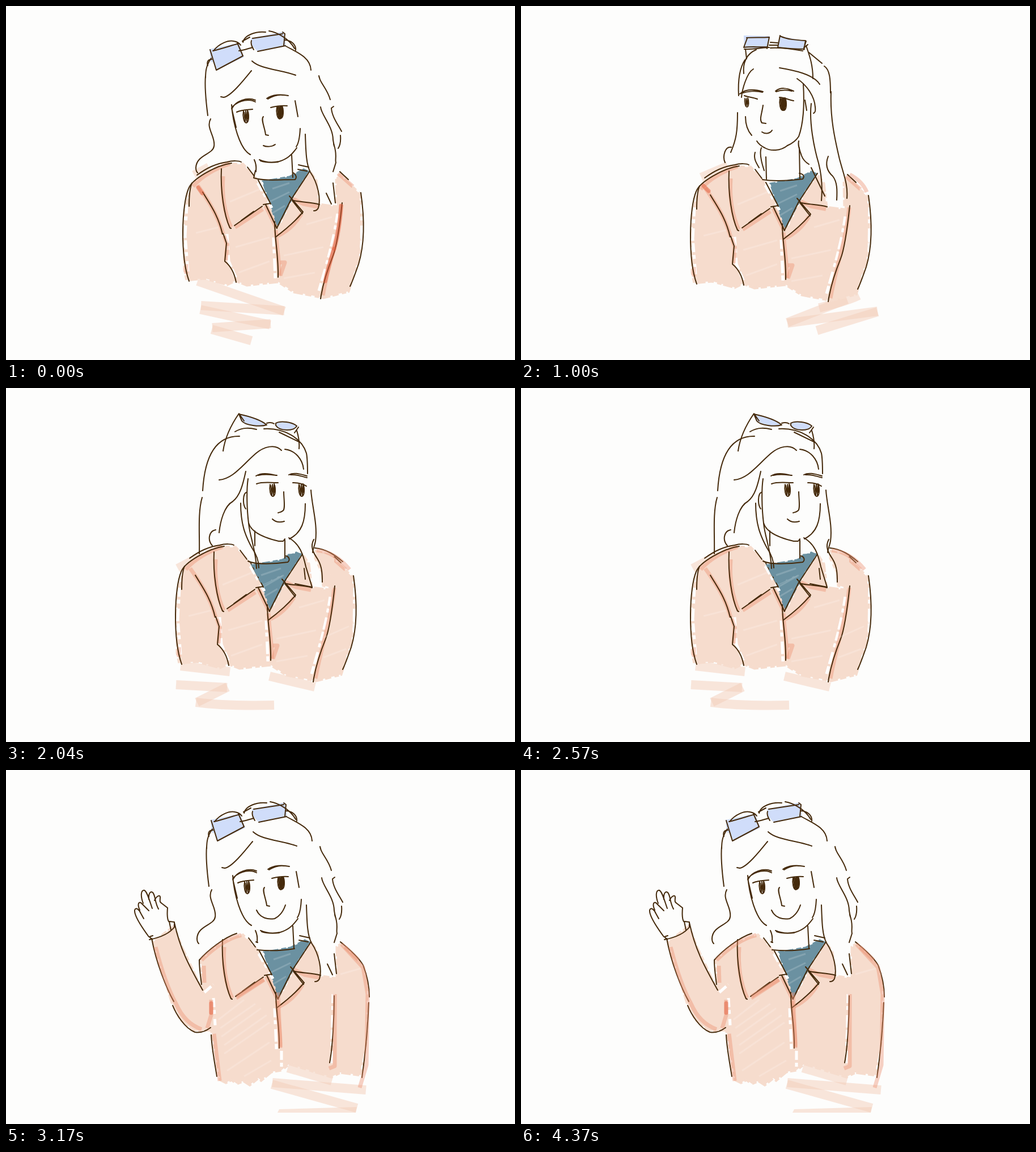
Animation, 898 px wide and 624 px high, one loop 5050 ms. Source, as an HTML page:

```html
<!DOCTYPE html>
<html lang="en">
<head>
<meta charset="utf-8">
<title>Sketch portrait</title>
<style>
html, body { margin: 0; width: 100%; height: 100%; overflow: hidden; background: #fdfdfc; }
svg { display: block; width: 898px; height: 624px; }
path { fill: none; }
.ink { stroke: #452a0b; stroke-width: 2; stroke-linecap: round; stroke-linejoin: round; }
.cloth { fill: #f6dccd; stroke: #f6dccd; stroke-width: 5; stroke-dasharray: 11 4 17 3 8 6; }
.gap path { stroke: #fff; stroke-width: 5; stroke-dasharray: 16 5 7 9 22 4; }
.streak path { stroke: #fff; stroke-width: 3; opacity: .17; }
.shade path { stroke: #ec9273; stroke-width: 7; opacity: .42; stroke-linejoin: round; }
.red path { stroke: #e25f3e; stroke-width: 7; opacity: .52; stroke-linecap: round; }
.wash path { stroke: #f3cdb9; stroke-width: 16; opacity: .5; }
.wash .tip { fill: #f3cdb9; stroke: none; }
.shirt { fill: #6b91a1; stroke: #6b91a1; stroke-width: 3; stroke-dasharray: 9 3 14 5; }
.lens { fill: #d0ddfa; }
.pose { visibility: hidden; animation: 5.05s step-end infinite; }
#front { animation-name: one; }
#left { animation-name: two; }
#right { animation-name: three; }
#wave { animation-name: four; }
@keyframes one { 0% { visibility: visible } 19.79%, 100% { visibility: hidden } }
@keyframes two { 0% { visibility: hidden } 19.79% { visibility: visible } 40.38%, 100% { visibility: hidden } }
@keyframes three { 0% { visibility: hidden } 40.38% { visibility: visible } 62.76%, 100% { visibility: hidden } }
@keyframes four { 0% { visibility: hidden } 62.76%, 100% { visibility: visible } }
</style>
</head>
<body>
<svg viewBox="0 0 898 624">
<defs>
  <g id="eye">
    <path d="M-4-10C-6 0-3 11 1 11C6 10 6-4 3-11"/>
    <path d="M-3-8L-1 9L0-10L2 9L3-10L4 4"/>
  </g>

  <!-- shirt, lapels and front seam -->
  <g id="collar">
    <path class="shirt" d="M453 309L500 301 525 288 534 292 512 325 479 388 473 370 458 325Z"/>
    <g class="streak"><path d="M465 345L500 328"/><path d="M470 365L492 352"/><path d="M470 322L500 312"/></g>
    <g class="gap"><path d="M444 312L469 356"/><path d="M472 408L475 480"/></g>
    <g class="shade">
      <path d="M404 390L453 358"/><path d="M480 405C495 398 510 385 521 367"/>
      <path d="M506 340L525 349L551 354"/><path d="M458 352L477 392"/>
      <path d="M476 395C477 425 483 450 482 476"/><path d="M383 300C380 340 388 370 397 390"/>
    </g>
    <g class="ink">
      <path d="M380 287C378 325 385 370 395 391L397 392"/>
      <path d="M403 387L452 353M415 378L437 362"/>
      <path d="M426 284L438 300M445 307L467 349M454 350L466 348M458 350L478 392"/>
      <path d="M536 291L503 341L478 391"/>
      <path d="M500 335L524 363C510 380 492 395 476 407M505 343L523 366"/>
      <path d="M508 343C520 346 540 346 553 350"/>
      <path d="M474 380C474 412 481 440 480 478"/>
    </g>
  </g>

  <!-- jacket with both arms down -->
  <g id="coat">
    <path class="cloth" d="M328 316L355 292 385 278 418 279 440 303 470 358 476 385 483 388 512 330 537 293 547 308 552 350 584 354 583 302 589 298 623 330 628 375 623 440 604 503 560 514 508 504 480 486 425 492 405 484 390 491 350 480 319 483 315 465 316 360Z"/>
    <g class="streak">
      <path d="M395 345L450 322"/><path d="M405 425L465 408"/><path d="M410 470L465 450"/>
      <path d="M490 440L560 425"/><path d="M490 480L545 470"/><path d="M530 385L575 372"/><path d="M335 400L375 390"/>
    </g>
    <g class="gap">
      <path d="M319 350L316 405 321 468"/><path d="M390 402L393 450 407 482"/>
      <path d="M585 366C577 420 564 460 552 502"/><path d="M628 350L627 430"/>
    </g>
    <g class="shade">
      <path d="M338 316C355 340 372 365 383 402"/><path d="M330 318C345 300 370 286 395 278"/>
      <path d="M385 405L390 420L388 448"/><path d="M586 295L612 318"/>
      <path d="M592 350C588 400 570 450 559 510"/><path d="M484 452L492 452L484 475"/>
      <path d="M318 455L318 472"/>
    </g>
    <g class="ink">
      <path d="M323 353C323 335 324 322 328 312"/>
      <path d="M398 277C370 281 328 305 322 322C310 350 307 440 323 485"/>
      <path d="M337 298C355 285 370 278 390 275C400 272 412 273 415 275"/>
      <path d="M347 328C360 350 374 368 382 402"/>
      <path d="M383 401L389 418L386 450C396 458 403 471 406 487"/>
      <path d="M593 347C590 375 585 420 577 440C565 470 558 495 555 516"/>
      <path d="M626 329C632 370 634 415 622 455C615 475 610 488 607 494"/>
      <path d="M589 292L604 306"/>
    </g>
  </g>

  <!-- head facing forward -->
  <g id="head">
    <path class="lens" d="M359 76L411 65L420 90L371 113L366 99L361 98Z"/>
    <path class="lens" d="M432 57L490 45L494 71L444 80L434 70Z"/>
    <g class="ink">
      <path d="M360 77L371 113L418 88L408 65M365 79C382 75 396 70 411 66"/>
      <path d="M366 79C376 66 392 60 402 62C408 63 412 66 414 69"/>
      <path d="M363 94C356 94 354 99 356 105M411 79C419 78 427 75 435 73"/>
      <path d="M433 61C431 66 434 72 437 77M444 80L493 70M435 57L488 49M488 46L492 49L490 70"/>
      <path d="M418 64C420 52 440 44 458 46M417 62L430 55"/>
      <path d="M464 44C478 46 500 58 509 75M491 60C503 60 512 68 511 78"/>
      <path d="M494 71C512 81 537 90 538 113"/>
      <path d="M362 92C353 105 352 115 352 127M352 123C350 145 353 170 356 193"/>
      <path d="M361 199C352 215 370 230 367 247C365 262 336 262 335 285C335 290 337 293 338 294"/>
      <path d="M434 97C450 112 485 112 511 122"/>
      <path d="M433 114C420 130 397 159 384 161L379 160"/>
      <path d="M552 123C553 135 566 144 572 165M552 123L554 130"/>
      <path d="M578 177L574 180C575 195 585 208 592 221"/>
      <path d="M555 178C556 192 577 212 577 236L579 247"/>
      <path d="M590 228C591 240 588 248 586 251M578 243C585 262 580 270 582 276L577 292"/>
      <path d="M577 312L581 347M565 330L574 349"/>
      <path d="M528 226C529 260 530 280 537 293C550 312 556 340 551 356C549 360 546 361 543 361"/>
      <path d="M516 280L534 284M515 288L531 291"/>
      <path d="M398 174C400 205 412 252 431 262M398 180L406 214"/>
      <path d="M399 180C405 168 425 160 440 166M400 177C412 166 430 163 440 169"/>
      <path d="M407 187C415 183 425 183 435 182M467 179C475 177 485 175 496 176"/>
      <path d="M460 163C470 156 485 155 498 158M462 164C472 158 480 156 488 157"/>
      <use href="#eye" x="423" y="195"/>
      <use href="#eye" x="482" y="188"/>
      <use href="#eye" x="484" y="187"/>
      <path d="M454 195C449 200 457 215 458 227L463 228"/>
      <path d="M510 167L515 195M519 216C518 236 515 244 512 248"/>
      <path d="M513 250C503 264 495 270 482 274C468 277 456 275 447 271M449 273C458 276 470 276 480 275"/>
      <path d="M438 271C443 282 441 287 441 292M504 263L506 302"/>
    </g>
  </g>
</defs>

<g id="front" class="pose">
  <g class="wash">
    <path d="M338 485L491 538"/><path d="M491 537L344 528"/><path d="M343 535L466 562"/>
    <path d="M467 560L364 567"/><path d="M363 570L433 590"/><path d="M332 298L358 284"/>
  </g>
  <use href="#coat"/>
  <g class="red"><path d="M591 352C589 385 584 412 579 428"/><path d="M579 428C570 455 566 470 563 485"/><path d="M339 320L346 330"/></g>
  <use href="#collar"/>
  <use href="#head"/>
  <g class="ink">
    <path d="M454 246C460 249 470 248 475 244"/>
    <path d="M440 290L437 303C455 309 485 306 510 306C514 302 511 297 507 294"/>
  </g>
</g>

<g id="left" class="pose">
  <g class="wash">
    <path d="M526 532C550 526 575 520 596 510"/><path d="M470 558L575 517"/>
    <path d="M470 559L629 538"/><path d="M522 572L629 539"/><path d="M318 302L365 282"/>
  </g>
  <use href="#coat" x="-13" y="5"/>
  <g class="red"><path d="M322 317L331 326"/></g>
  <g class="shade"><path d="M580 297C595 305 605 315 610 328"/></g>
  <use href="#collar" x="-13" y="4"/>
  <path class="lens" d="M393 52L439 53L435 74L394 74Z"/>
  <path class="lens" d="M457 53L503 62L499 77L453 73Z"/>
  <g class="ink">
    <path d="M398 56C410 55 425 56 438 55L434 75M399 57L393 73C408 71 420 73 434 72M394 76C408 77 420 74 438 73"/>
    <path d="M440 64L453 65M438 69L453 69"/>
    <path d="M457 52L453 73C470 75 485 76 500 76M457 53C470 59 485 60 502 61L499 77M503 62L499 74L506 68"/>
    <path d="M440 74C455 73 480 76 497 79M396 76L398 93M503 70C510 90 515 105 515 128"/>
    <path d="M415 77C398 84 391 100 393 119M395 95C384 112 383 140 384 158"/>
    <path d="M410 111C398 118 390 148 389 161"/>
    <path d="M456 109C480 113 516 120 527 138M487 128C505 140 518 160 519 178C520 185 519 188 516 189"/>
    <path d="M508 82L531 101M535 106C545 112 546 130 546 153"/>
    <path d="M547 151C545 200 555 240 562 270C570 300 577 315 575 339"/>
    <path d="M498 137C500 170 499 205 490 230C484 239 477 243 470 246"/>
    <path d="M470 246C458 256 440 256 430 250C424 247 419 243 416 238"/>
    <path d="M501 166L504 184M512 172C508 205 517 250 525 277C531 300 532 320 530 343"/>
    <path d="M512 285L536 335M542 265C536 280 541 292 550 300C558 310 558 325 557 342"/>
    <path d="M490 238C488 246 492 255 495 264C498 272 503 276 508 279"/>
    <path d="M396 195C396 210 400 220 407 228M382 188C382 220 380 235 370 258"/>
    <path d="M371 249C360 247 355 265 360 276M413 258C410 268 414 275 420 285M424 250C420 260 424 275 429 290"/>
    <path d="M386 155C395 147 410 146 427 151M388 154C400 150 415 149 426 152"/>
    <path d="M449 150C458 143 468 144 481 150M450 151C460 147 472 148 478 150"/>
    <path d="M394 158C398 160 410 161 417 164M456 161C462 160 470 165 481 167"/>
    <use href="#eye" transform="translate(398 170)scale(.75)"/>
    <use href="#eye" x="461" y="173"/>
    <use href="#eye" x="463" y="173"/>
    <path d="M427 175C425 190 420 200 425 206L432 207M425 222C432 227 440 224 443 219"/>
    <path d="M432 266L433 305M491 250L492 304"/>
    <path d="M426 306C450 310 480 307 497 305C501 300 498 296 491 295"/>
  </g>
</g>

<g id="right" class="pose">
  <g class="wash">
    <path d="M300 523L390 528"/><path d="M391 527L337 554"/><path d="M335 554C380 560 430 560 473 559"/>
    <path d="M465 508L545 527"/><path d="M303 318L345 296"/><path d="M308 490L395 500"/>
  </g>
  <use href="#coat" x="-13" y="2"/>
  <path class="cloth" d="M547 288L577 296L574 352L560 348L558 325L546 300Z"/>
  <use href="#collar" x="-13" y="2"/>
  <path class="shirt" d="M434 312L492 308L496 294L519 293L495 325L452 345Z"/>
  <g class="streak"><path d="M455 350L490 330"/><path d="M450 330L485 318"/><path d="M560 440L605 420"/><path d="M560 475L600 460"/></g>
  <path class="lens" d="M411 46C425 49 448 55 460 65C448 69 422 66 416 58Z"/>
  <path class="lens" d="M476 62C485 57 505 60 513 67C508 77 482 76 476 66Z"/>
  <g class="ink">
    <path d="M411 46C425 49 448 55 460 65C448 69 422 66 416 58ZM413 48L420 58"/>
    <path d="M476 62C485 57 505 60 513 67C508 77 482 76 476 66Z"/>
    <path d="M411 45C395 68 386 90 383 111M460 62C466 60 470 61 473 63M509 79L516 69M513 75C516 85 518 97 517 107"/>
    <path d="M347 181C350 130 365 84 412 85M404 77C418 69 430 70 442 73"/>
    <path d="M455 72C490 70 522 88 530 115C532 125 532 140 532 151M482 78L517 95"/>
    <path d="M346 193C338 220 342 260 341 292"/>
    <path d="M376 162C400 160 415 138 440 116C455 103 475 98 486 110M441 115L448 110"/>
    <path d="M492 108C510 110 523 125 525 143"/>
    <path d="M423 147C418 170 413 190 400 200C385 208 378 235 376 255"/>
    <path d="M427 160C424 180 425 215 428 238C433 255 455 264 481 270L489 270L492 266"/>
    <path d="M424 184C418 186 417 205 423 213M414 203C414 240 422 260 434 282C443 295 446 305 446 317"/>
    <path d="M428 238C430 262 441 285 442 318M370 250C358 252 355 268 364 278"/>
    <path d="M538 180C540 210 550 240 546 270C544 280 541 285 541 290"/>
    <path d="M528 204C528 235 522 255 500 266M499 264C518 275 524 292 529 315L540 351L510 345"/>
    <path d="M543 267C536 280 542 290 550 302C558 315 558 330 558 342M526 318L528 337"/>
    <path d="M441 155C450 149 462 150 476 154M445 154C458 151 468 153 478 154"/>
    <path d="M499 153C508 148 520 152 531 155M502 153C513 152 522 156 531 158"/>
    <path d="M442 169C452 165 465 167 480 167M506 167C515 167 524 169 530 173"/>
    <use href="#eye" x="470" y="180"/>
    <use href="#eye" x="521" y="180"/>
    <path d="M490 183C490 195 493 212 489 216C486 219 483 219 480 220M470 231C476 237 484 237 491 235"/>
    <path d="M439 252L439 278M492 268L492 300"/>
    <path d="M427 305C440 312 475 310 497 307C502 303 499 297 494 296"/>
    <path d="M545 282C565 284 580 294 594 306"/>
  </g>
  <g class="shade"><path d="M548 286C570 288 590 300 606 320"/></g>
</g>

<g id="wave" class="pose">
  <g class="wash">
    <path d="M497 525L575 548"/><path d="M470 551L635 564"/><path d="M469 554L619 596"/>
    <path class="tip" d="M482 598L619 594L617 604L479 604Z"/>
  </g>
  <path class="cloth" d="M344 336L382 304 418 291 442 316 472 370 478 396 486 398 514 342 539 306 549 320 554 363 584 368 584 312 592 306 630 347 637 375 636 470 627 538 590 533 574 541 500 518 486 529 468 532 450 547 445 543 430 555 419 548 407 553 398 546 388 551 378 546 365 470 362 458 332 460 308 440 293 410 260 303 296 276 310 312 346 388 347 365Z"/>
  <g class="streak">
    <path d="M375 440L420 405"/><path d="M380 470L450 420"/><path d="M385 500L465 445"/><path d="M390 530L465 480"/>
    <path d="M378 455L440 412"/><path d="M385 485L460 432"/><path d="M420 540L468 512"/>
    <path d="M590 360L625 350"/>
  </g>
  <g class="gap">
    <path d="M350 392L366 378"/><path d="M366 402L369 450"/><path d="M577 395L574 520"/><path d="M634 500L628 530"/>
    <path d="M486 495L486 530"/>
  </g>
  <use href="#collar" x="2" y="12"/>
  <use href="#head" x="2" y="12"/>
  <g class="ink">
    <path d="M442 247C448 261 462 264 474 262C484 257 490 247 493 238"/>
    <path d="M441 303L444 304M443 317C470 320 490 318 509 315"/>
    <path d="M297 269C308 320 326 350 347 388M257 297C265 340 283 385 296 408"/>
    <path d="M294 415C300 430 315 455 333 462C343 464 353 460 361 454"/>
    <path d="M341 335C355 319 385 295 407 288M341 335C341 350 343 362 345 378"/>
    <path d="M362 467C363 490 368 515 372 540"/>
    <path d="M579 398C579 440 576 490 571 516"/>
    <path d="M590 303C606 316 622 330 630 344C637 362 641 380 641 400M640 410C638 460 634 500 628 542"/>
    <path d="M253 299C268 296 287 290 297 277M258 299L253 294L259 292M289 267L297 268L297 277M288 267L291 282"/>
    <path d="M252 294C238 275 226 255 227 247C229 241 235 246 238 253L243 262"/>
    <path d="M236 247C232 238 233 232 238 234L252 248"/>
    <path d="M242 235C237 222 238 211 244 212C249 214 253 230 258 244"/>
    <path d="M252 228C251 217 255 213 259 216C264 222 262 232 269 245"/>
    <path d="M262 230C266 221 272 220 272 224C272 232 270 232 276 236L285 243C284 255 284 262 287 267"/>
  </g>
  <g class="shade">
    <path d="M264 312C275 355 288 390 300 412C310 435 325 450 345 457"/><path d="M362 405L362 432L355 455"/>
    <path d="M345 335C365 315 390 297 415 291"/><path d="M349 345L350 375"/><path d="M367 465L377 548"/>
    <path d="M592 307L630 348L638 395L636 520L624 560"/><path d="M580 395L580 522L570 526"/><path d="M598 312L622 335"/>
    <path d="M407 399L455 369"/><path d="M480 392L484 490"/>
  </g>
  <g class="red"><path d="M362 411L362 428"/></g>
</g>
</svg>
</body>
</html>
```
